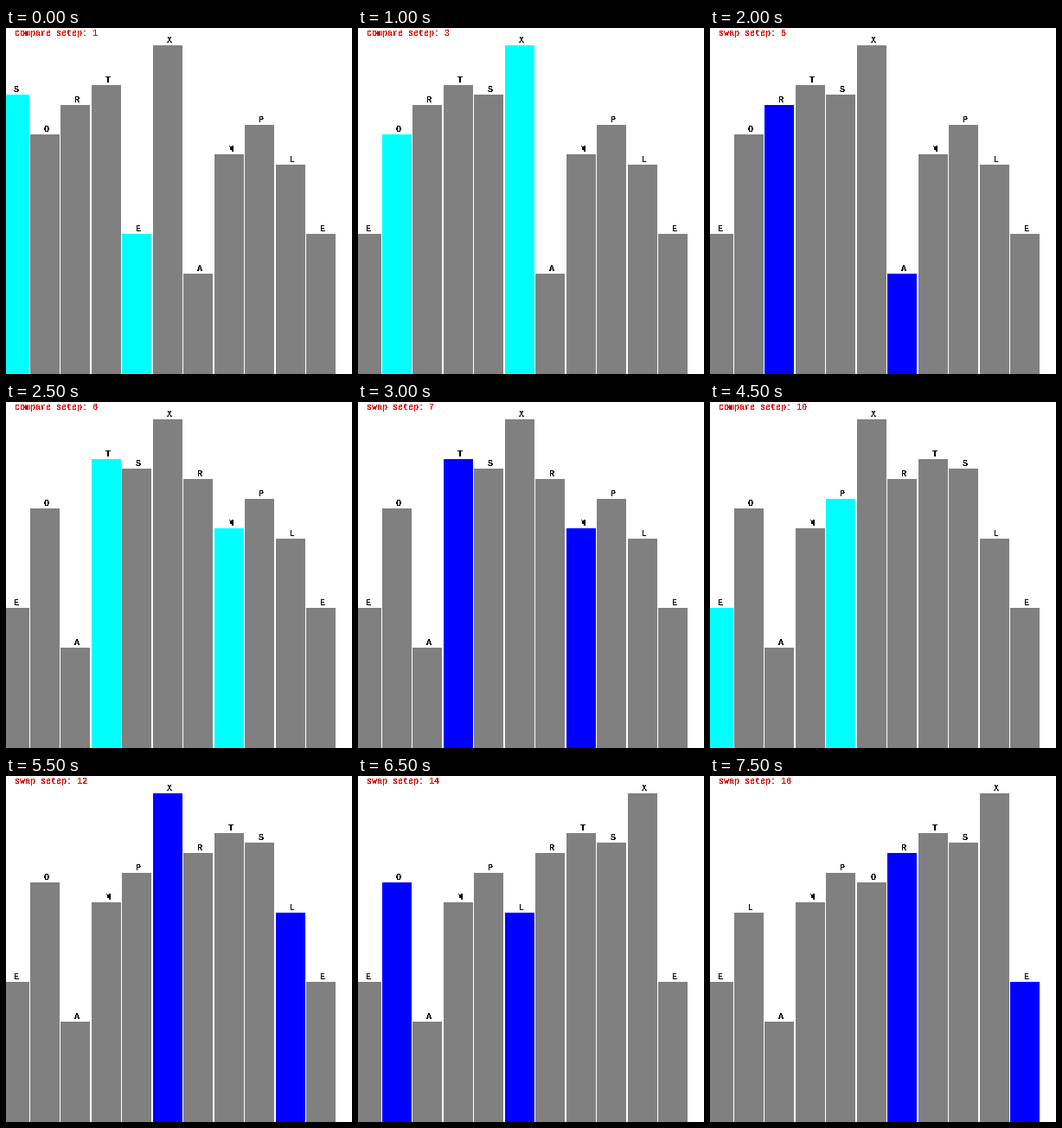
A matplotlib script that plays this animation: 400x400 px, repeating every 8 s.

```python
import matplotlib.pyplot as plt
from matplotlib.animation import FuncAnimation

WORD = "SORTEXAMPLE"
GAP = 4
STEPS = 16
STEP_MS = 500
SIZE = 400
DPI = 100
BAR_W = 34
PITCH = 390 / 11
COLORS = {"compare": "#00ffff", "swap": "#0000ff"}
GRAY = "#808080"


def shell_pass(word, gap):
    """Yield (action, letters, i, j) for one gapped insertion pass."""
    a = list(word)
    for i in range(gap, len(a)):
        j = i
        while j >= gap:
            yield "compare", a[:], j - gap, j
            if a[j] >= a[j - gap]:
                break
            yield "swap", a[:], j - gap, j
            a[j], a[j - gap] = a[j - gap], a[j]
            j -= gap


def bar_top(letter):
    return round(284 - 264 / 23 * (ord(letter) - ord("A")))


def bar_left(i):
    return round(28 + PITCH * (i - 1))


steps = list(shell_pass(WORD, GAP))[:STEPS]

fig = plt.figure(figsize=(SIZE / DPI, SIZE / DPI), dpi=DPI, facecolor="white")
ax = fig.add_axes([0, 0, 1, 1])
ax.set_xlim(0, SIZE)
ax.set_ylim(SIZE, 0)
ax.axis("off")

font = dict(family="Liberation Mono", weight="bold", size=10 * 72 / DPI,
            va="baseline", antialiased=False)
title = ax.text(10, 9, "", color="#d80000", **font)
bars, labels = [], []
for k in range(len(WORD)):
    x = bar_left(k)
    bars.append(ax.add_patch(plt.Rectangle((x, 0), BAR_W, 0, lw=0, antialiased=False)))
    labels.append(ax.text(x + 16, 0, "", color="black", **font))


def draw(n):
    action, letters, i, j = steps[n]
    title.set_text(f"{action} setep: {n + 1}")
    for k, letter in enumerate(letters):
        top = bar_top(letter)
        bars[k].set_y(top)
        bars[k].set_height(SIZE - top)
        bars[k].set_facecolor(COLORS[action] if k in (i, j) else GRAY)
        labels[k].set_text(letter)
        labels[k].set_y(top - 3)
    return [title, *bars, *labels]


anim = FuncAnimation(fig, draw, frames=STEPS, interval=STEP_MS,
                     repeat=True, repeat_delay=0, blit=False)
plt.show()
```
